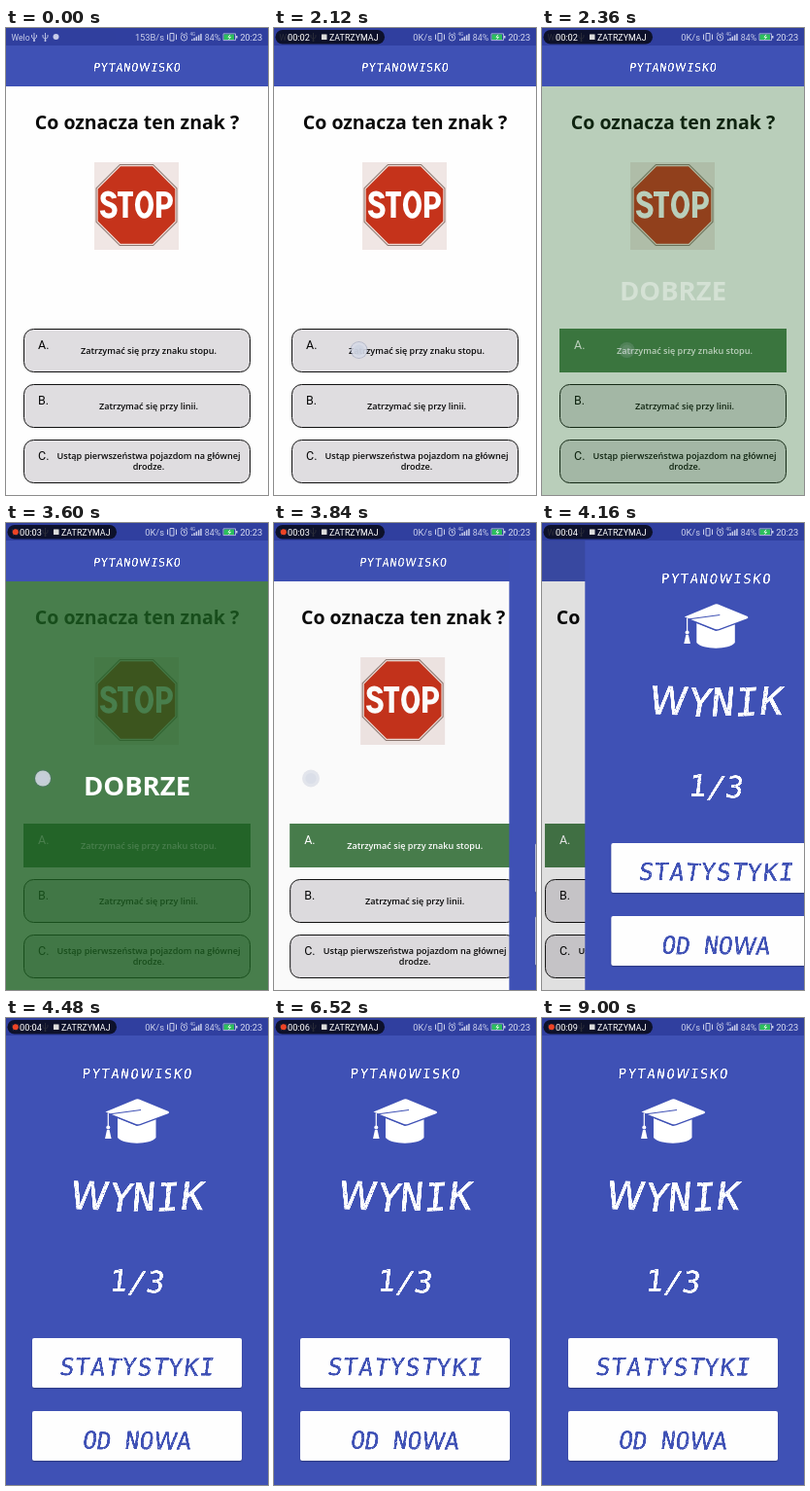
These frames come from a looping animation (270 px wide and 480 px high, 9040 ms). An HTML page with a canvas:

```html
<!DOCTYPE html>
<html lang="pl">
<head>
<meta charset="utf-8">
<title>Quiz</title>
<style>
html, body { margin: 0; width: 100%; height: 100%; overflow: hidden; background: #3f51b5; }
canvas { display: block; width: 100vw; height: 100vh; }
</style>
</head>
<body>
<canvas id="stage"></canvas>
<script>
const W = 270, H = 480, LOOP = 9040;
const BLUE = '#3f51b5', DARK = '#303f9f', PAPER = '#fefefe', PALE = '#c8cdea';
const SANS = '"Open Sans", "Noto Sans", sans-serif';
const UI = 'Roboto, "Noto Sans", sans-serif';
const TITLE = 'PYTANOWISKO';
const canvas = document.getElementById('stage');
const ctx = canvas.getContext('2d');

const clamp = v => Math.max(0, Math.min(1, v));
const ramp = (t, a, b) => clamp((t - a) / (b - a));

function seeded(seed) {
  return () => (seed = (seed * 16807) % 2147483647) / 2147483647;
}

function text(str, x, y, font, color, align = 'left') {
  ctx.font = font;
  ctx.fillStyle = color;
  ctx.textAlign = align;
  ctx.fillText(str, x, y);
}

function rect(x, y, w, h, color) {
  ctx.fillStyle = color;
  ctx.fillRect(x, y, w, h);
}

function disc(x, y, r, color) {
  ctx.beginPath();
  ctx.arc(x, y, r, 0, Math.PI * 2);
  ctx.fillStyle = color;
  ctx.fill();
}

function line(path, color, width) {
  ctx.strokeStyle = color;
  ctx.lineWidth = width;
  ctx.stroke(new Path2D(path));
}

function faded(alpha, draw) {
  if (alpha <= 0) return;
  ctx.save();
  ctx.globalAlpha = alpha;
  draw();
  ctx.restore();
}

// Chalk lettering: slanted, slightly tilted glyphs with small crumbs rubbed out.
function chalk(str, size, gap, color, seed) {
  const scale = 3, h = size * 1.6;
  const layer = document.createElement('canvas');
  layer.width = W * scale;
  layer.height = h * scale;
  const c = layer.getContext('2d');
  const rnd = seeded(seed);
  const font = ch => `${size}px ${ch === 'W' ? '"DejaVu Sans"' : '"DejaVu Sans Mono"'}, monospace`;
  const widths = [...str].map(ch => {
    c.font = font(ch);
    return c.measureText(ch).width;
  });
  const total = widths.reduce((a, b) => a + b, 0) + gap * (str.length - 1);
  c.scale(scale, scale);
  c.fillStyle = c.strokeStyle = color;
  c.lineWidth = size * 0.015;
  c.textAlign = 'center';
  let x = (W - total) / 2;
  [...str].forEach((ch, i) => {
    c.save();
    c.translate(x + widths[i] / 2 - size * 0.04, size * 1.1 + (rnd() - 0.5) * size * 0.05);
    c.rotate((rnd() - 0.5) * 0.1);
    c.transform(1, 0, -0.12, 1, 0, 0);
    c.font = font(ch);
    c.fillText(ch, 0, 0);
    c.strokeText(ch, 0, 0);
    c.restore();
    x += widths[i] + gap;
  });
  c.globalCompositeOperation = 'destination-out';
  const crumbs = total * size * 0.1;
  for (let i = 0; i < crumbs; i++) {
    c.globalAlpha = 0.3 + rnd() * 0.6;
    c.fillRect((W - total) / 2 + rnd() * total, size * (0.3 + rnd() * 0.9),
      0.3 + rnd() * 0.9, 0.3 + rnd() * 0.5);
  }
  return baseline => ctx.drawImage(layer, 0, baseline - size * 1.1, W, h);
}

const chalks = {
  header: chalk(TITLE, 11.5, 0.9, '#fff', 11),
  title: chalk(TITLE, 13.6, 1.7, '#fff', 23),
  result: chalk('WYNIK', 39.5, 1, '#fff', 37),
  score: chalk('1/3', 30.5, 0.4, '#fff', 41),
  stats: chalk('STATYSTYKI', 24.5, 1.3, BLUE, 53),
  again: chalk('OD NOWA', 24.5, -0.1, BLUE, 67)
};

function octagon(cx, cy, r) {
  ctx.beginPath();
  for (let i = 0; i < 8; i++) {
    const a = Math.PI / 8 + i * Math.PI / 4, d = r / Math.cos(Math.PI / 8);
    ctx.lineTo(cx + d * Math.cos(a), cy + d * Math.sin(a));
  }
  ctx.closePath();
}

function stopSign() {
  rect(91, 138, 87, 90, '#f0e6e4');
  [[42, '#8d7a74'], [41, '#f0dcd6'], [39.8, '#c5331b']].forEach(([r, color]) => {
    octagon(134.5, 182, r);
    ctx.fillStyle = color;
    ctx.fill();
  });
  line('M111.5 175C110 168.5 100 168.5 100 175C100 183 112 179 112 187.5C112 195 100 195 99.3 187.5'
    + 'M115 170.5H131M123 170V195M135.5 181.5a7 11.7 0 1 1 14 0a7 11.7 0 1 1-14 0'
    + 'M157.5 195V170.5H163C171.5 170.5 171.5 184 163 184H158', '#fff', 5.2);
}

function answer(letter, y, lines, picked) {
  if (picked) {
    rect(18, y, 234, 45, 'rgba(27,94,32,.8)');
  } else {
    ctx.beginPath();
    ctx.roundRect(18.5, y + 0.5, 233, 44, 10);
    ctx.fillStyle = '#dfdde0';
    ctx.fill();
    ctx.strokeStyle = '#111';
    ctx.lineWidth = 1;
    ctx.stroke();
  }
  const ink = picked ? '#fff' : '#0a0a0a';
  text(letter + '.', 33, y + 21, '12.5px ' + UI, ink);
  const first = lines.length > 1 ? 20 : 26;
  lines.forEach((s, i) => text(s, 147, y + first + i * 11, '600 9.1px ' + SANS, ink, 'center'));
}

function quizPage(picked, cover) {
  rect(0, 18, W, H, PAPER);
  rect(0, 18, W, 42, BLUE);
  chalks.header(44.5);
  text('Co oznacza ten znak ?', 135, 104, '700 19.5px ' + SANS, '#0a0a0a', 'center');
  stopSign();
  answer('A', 309, ['Zatrzymać się przy znaku stopu.'], picked);
  answer('B', 366, ['Zatrzymać się przy linii.']);
  answer('C', 423, ['Ustąp pierwszeństwa pojazdom na głównej', 'drodze.']);
  faded(cover, () => {
    rect(0, 60, W, H - 60, 'rgba(27,94,32,.8)');
    text('DOBRZE', 135, 280, '700 27.5px ' + SANS, '#fff', 'center');
  });
}

function gradCap() {
  ctx.fillStyle = '#fff';
  ctx.fill(new Path2D('M115 103V123C121 130.5 149 130.5 154.5 123V103L135 111Z'));
  const board = new Path2D('M102.5 96.5L134 83.5Q135.5 83 137 83.5L167.5 96Q169 97.2 167 98.3L138 109Q136 109.6 134 109Z');
  ctx.strokeStyle = BLUE;
  ctx.lineWidth = 2.4;
  ctx.stroke(board);
  ctx.fill(board);
  line('M139 94.5L105.5 99V113', BLUE, 1);
  line('M105.3 98V112', '#fff', 1.2);
  disc(105.3, 112.5, 2, '#fff');
  ctx.fill(new Path2D('M104 115H106.6L108.6 124H102Z'));
}

function button(y) {
  ctx.save();
  ctx.shadowColor = 'rgba(0,0,0,.3)';
  ctx.shadowBlur = 1.5;
  ctx.shadowOffsetY = 1;
  ctx.beginPath();
  ctx.roundRect(27, y, 216, 51, 2);
  ctx.fillStyle = PAPER;
  ctx.fill();
  ctx.restore();
}

function resultPage() {
  rect(0, 18, W, H, BLUE);
  chalks.title(62);
  gradCap();
  chalks.result(197.5);
  chalks.score(281.5);
  button(329);
  button(404);
  chalks.stats(367.5);
  chalks.again(443);
}

function usb(x) {
  line(`M${x} 5V13M${x - 2.5} 7V9.5L${x} 11.5L${x + 2.5} 9.5V7`, PALE, 0.9);
  disc(x, 13, 1, PALE);
}

function statusBar(t) {
  rect(0, 0, W, 18, DARK);
  text('Welo', 5.5, 12.5, '8.6px ' + UI, PALE);
  usb(29);
  usb(40.5);
  disc(51.5, 9, 3, PALE);
  text(t < 1200 ? '153B/s' : '0K/s', 163, 12.5, '9.3px ' + UI, PALE, 'right');
  line('M169 5.5H173V13H169ZM166.5 6.5V12M175.5 6.5V12', PALE, 1);
  line('M180.3 9.8a3.2 3.2 0 1 1 6.4 0a3.2 3.2 0 1 1-6.4 0M183.5 7.7V10H185M179.8 6.5L182 4.8M187.2 6.5L185 4.8', PALE, 0.9);
  text('4G', 189.5, 8, '4.5px ' + UI, PALE);
  for (let i = 0; i < 5; i++) rect(191 + i * 2.3, 11.5 - i * 1.4, 1.5, 1.5 + i * 1.4, PALE);
  text('84%', 204.8, 12.5, '8.8px ' + UI, PALE);
  line('M224 5.9H236.5V12.6H224Z', PALE, 0.8);
  rect(237, 8, 1.5, 2.5, PALE);
  rect(224.6, 6.5, 10.4, 5.5, '#2cbf5c');
  line('M231 6.8L229 9.4H231.5L229.5 11.8', '#fff', 0.8);
  text('20:23', 264.3, 12.8, '9.3px ' + UI, '#d8dcf2', 'right');
}

function recorder(t) {
  faded(ramp(t, 0, 180), () => {
    ctx.beginPath();
    ctx.roundRect(1.5, 2, 112.5, 14.5, 7.2);
    ctx.fillStyle = 'rgba(4,5,14,.8)';
    ctx.fill();
    if (t >= 9000 || t % 1000 >= 480) disc(9.8, 9.3, 3, '#ee4426');
    text('00:0' + Math.floor(t / 1000), 14, 12.6, '9.2px ' + UI, '#fff');
    rect(49, 6.5, 5.5, 5.5, '#dcdcdc');
    text('ZATRZYMAJ', 57, 12.6, '8.9px ' + UI, '#fff');
  });
}

function touch(x, y, alpha) {
  faded(alpha, () => {
    disc(x, y, 9, 'rgba(90,105,150,.3)');
    disc(x, y, 8, 'rgba(225,228,238,.8)');
    disc(x, y, 5.5, 'rgba(200,206,222,.6)');
  });
}

function draw(t) {
  const u = ramp(t, 3810, 4400);
  const slide = 1 - (1 - u) ** 2;
  if (slide < 1) {
    ctx.save();
    ctx.translate(-18 * slide, 0);
    quizPage(t >= 2200, ramp(t, 2200, 2620) * (1 - ramp(t, 3680, 3800)));
    ctx.restore();
    rect(0, 18, W, H, `rgba(0,0,0,${0.14 * slide})`);
  }
  if (slide > 0) {
    ctx.save();
    ctx.translate(W * (1 - slide), 0);
    resultPage();
    ctx.restore();
  }
  touch(87.5, 331, ramp(t, 1960, 2040) * (1 - ramp(t, 2160, 2400)));
  touch(38, 262.5, ramp(t, 3480, 3560) * (1 - ramp(t, 3660, 4000)));
  statusBar(t);
  recorder(t);
}

function resize() {
  const dpr = window.devicePixelRatio || 1;
  canvas.width = Math.round(innerWidth * dpr);
  canvas.height = Math.round(innerHeight * dpr);
}
addEventListener('resize', resize);
resize();

const start = performance.now();
function tick() {
  ctx.setTransform(canvas.width / W, 0, 0, canvas.height / H, 0, 0);
  draw((performance.now() - start) % LOOP);
  requestAnimationFrame(tick);
}
tick();
</script>
</body>
</html>
```
